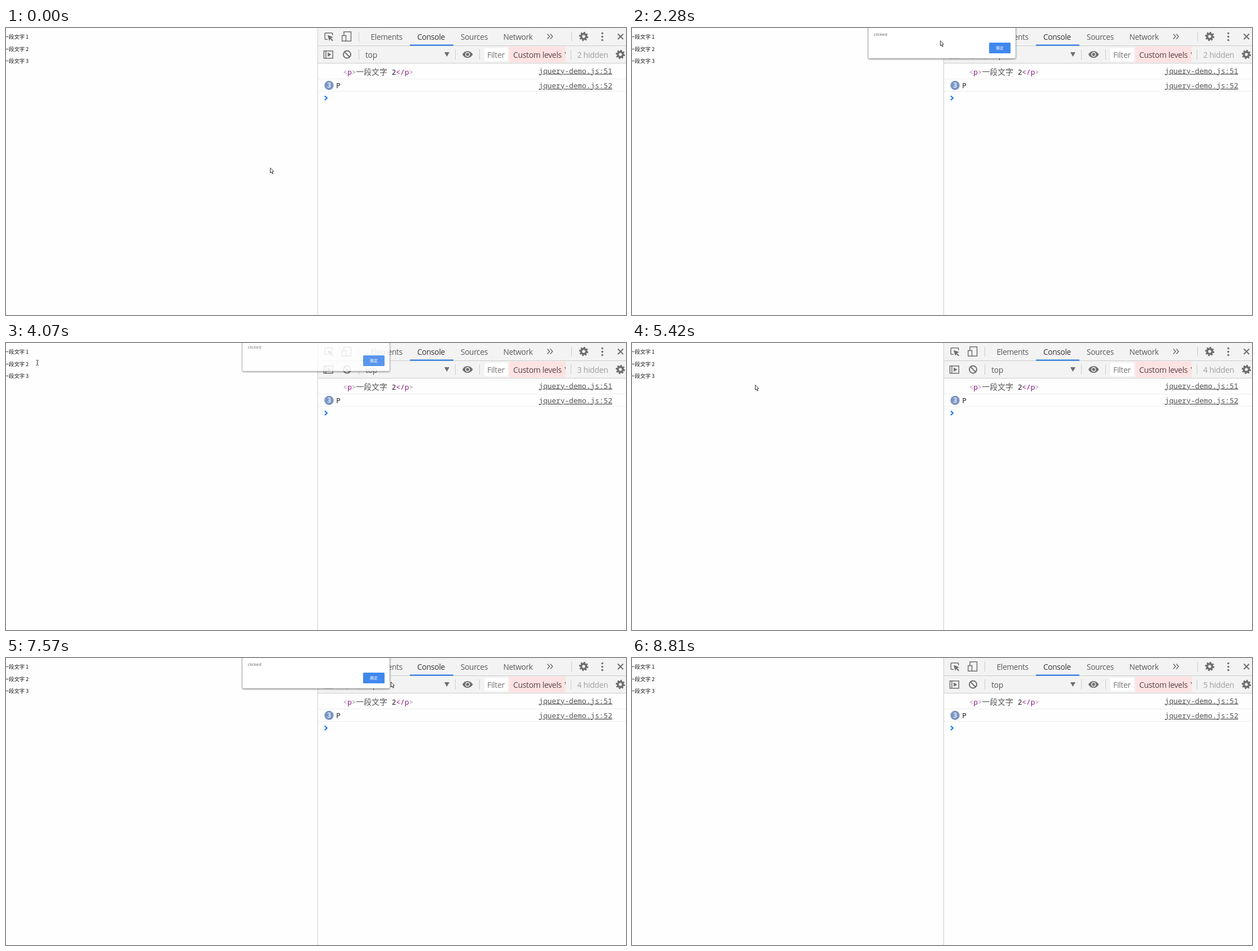
Recreate the animation shown at these times as an HTML page. Size 1099 px wide and 510 px high, loop 9.22 s.

```html
<!DOCTYPE html>
<html lang="zh">
<head>
<meta charset="utf-8">
<title>Click demo</title>
<style>
  html, body { margin: 0; width: 100%; height: 100%; overflow: hidden; background: #fefefe; }
  svg { display: block; }
  text { white-space: pre; }
  .page { font: 9.3px "Noto Sans CJK SC", "Noto Sans CJK", sans-serif; fill: #111; }
  .ui { font: 13.7px "Open Sans", "Noto Sans", sans-serif; letter-spacing: -.025em; fill: #5a5a5a; }
  .mono { font: 12.75px "Noto Sans Mono", "DejaVu Sans Mono", monospace; fill: #222; }
  .cjk { font: 300 13.8px "Noto Sans CJK SC", "Noto Sans CJK", sans-serif; fill: #555; }
  .tip { font: 7.1px "Open Sans", "Noto Sans", sans-serif; fill: #5f6368; }
  .link { fill: #545454; text-decoration: underline; }
  .tag { fill: #881280; }
  .bracket { fill: #a894a6; }
  .icon { fill: none; stroke: #6e6e6e; stroke-width: 1.5; }
  .solid { fill: #6e6e6e; }
  .rule { fill: none; stroke: #ccc; }
  .shadow { filter: drop-shadow(0 1px 1.5px #0008); }
</style>
</head>
<body>
<svg width="1099" height="510" viewBox="0 0 1099 510">
  <defs>
    <g id="gear" class="icon">
      <circle r="4.6" stroke-width="3.6"/>
      <circle r="7" stroke-width="2.4" pathLength="16" stroke-dasharray="1"/>
    </g>
  </defs>

  <g class="page">
    <text x="-4.2" y="19">一段文字 1</text>
    <text x="-4.2" y="40.5">一段文字 2</text>
    <text x="-4.2" y="62">一段文字 3</text>
  </g>

  <g id="highlight">
    <path fill="#f6b26b" fill-opacity=".66" d="M0 21.5H547V31H0zM0 43H547V52.5H0z"/>
    <path fill="#6fa8dc" fill-opacity=".66" d="M0 31H547V43H0z"/>
    <path class="shadow" fill="#fff" d="M-4 57H3L6 53.5 9 57H80.5a2 2 0 0 1 2 2V125a2 2 0 0 1-2 2H-4z"/>
    <g class="tip">
      <text class="tag" x="1" y="69" font-weight="700">p</text>
      <text x="77" y="68.5" text-anchor="end">948 × 21</text>
      <text x="1" y="86" style="font-size:6.6px;letter-spacing:.45px" fill="#333">ACCESSIBILITY</text>
      <text x="1" y="99">Name</text>
      <text x="1" y="110">Role</text>
      <text x="77" y="110" text-anchor="end" style="fill:#303942">paragraph</text>
      <text x="1" y="121">Keyboard-focusable</text>
    </g>
    <path class="rule" d="M55 83.5H77"/>
    <g class="icon" stroke-width=".8" style="stroke-width:.8">
      <circle cx="72.3" cy="118" r="3.3"/><path d="M70 115.7 74.6 120.3"/>
    </g>
  </g>

  <g id="devtools">
    <path fill="#fefefe" d="M552 0H1099V510H552z"/>
    <path fill="#f3f3f3" d="M553 0H1099V62H553z"/>
    <path class="rule" d="M552.5 0V510M553 31.5H1099M553 62.5H1099M625.5 7V24M1002.5 7V24M625.5 38V56M796.5 38V56M839.5 38V56M1001.5 38V56"/>
    <path class="rule" style="stroke:#eee" d="M553 90.5H1099M553 112.5H1099"/>
    <path fill="#1a73e8" d="M716 29.5H793V31.5H716z"/>

    <path class="icon" d="M570 20.3H566.5a1.2 1.2 0 0 1-1.2-1.2V10a1.2 1.2 0 0 1 1.2-1.2H577.6a1.2 1.2 0 0 1 1.2 1.2V13"/>
    <path class="solid" d="M570 12.5 580 16.3 576 18 580 22 578.6 23.4 574.6 19.4 573 23z"/>
    <path class="icon" d="M599 13V6.8H611.5V23.2H603M595.8 13.5H602.5V23.2H595.8z"/>
    <path class="icon" d="M563.5 40.7H579.3V53.8H563.5zM567 41V54"/>
    <path class="solid" d="M570.3 43.5 576.5 47.2 570.3 51z"/>
    <g class="icon" style="stroke-width:2"><circle cx="604.5" cy="47" r="6.5"/><path d="M600 42.5 609 51.5"/></g>
    <path class="solid" d="M777 43H786L781.5 51z"/>
    <path class="solid" d="M809 47C813 39 823 39 827.5 47 823 55 813 55 809 47z"/>
    <circle cx="818.2" cy="47" r="3.5" fill="none" stroke="#f3f3f3" stroke-width="1.5"/>
    <path class="icon" d="M959.5 10.5 963.5 15 959.5 19.5M964.8 10.5 968.8 15 964.8 19.5"/>
    <use href="#gear" x="1024" y="15"/>
    <use href="#gear" x="1089" y="47"/>
    <g class="solid"><circle cx="1057" cy="9.5" r="1.8"/><circle cx="1057" cy="15.5" r="1.8"/><circle cx="1057" cy="21.5" r="1.8"/></g>
    <path class="icon" style="stroke-width:2" d="M1084.5 10.5 1094 20M1094 10.5 1084.5 20"/>

    <path fill="#fff" d="M848 35.5H889.5V58.5H848z"/>
    <path fill="#ffe2e2" d="M892 33H992V61H892z"/>
    <path fill="#555" d="M990.3 43H992V47z"/>
    <g class="ui">
      <text x="646.5" y="21">Elements</text>
      <text x="729" y="21" style="fill:#333">Console</text>
      <text x="806" y="21">Sources</text>
      <text x="881.5" y="21">Network</text>
      <g style="font-size:14px">
        <text x="637" y="52.5">top</text>
        <text x="853" y="52.5" style="fill:#757575">Filter</text>
        <text x="899" y="52.5" style="fill:#5a4545">Custom levels</text>
        <text id="hidden" x="1012.5" y="52.5" style="fill:#a0a0a0"></text>
      </g>
    </g>

    <g class="mono">
      <text y="82.5"><tspan x="597.5" class="bracket">&lt;</tspan><tspan class="tag">p</tspan><tspan class="bracket">&gt;</tspan><tspan x="620.5" class="cjk">一段文字</tspan><tspan x="683.7">2</tspan><tspan class="tag">&lt;/p</tspan><tspan class="bracket">&gt;</tspan></text>
      <text class="link" x="944.5" y="80.5">jquery-demo.js:51</text>
      <text class="link" x="944.5" y="107">jquery-demo.js:52</text>
      <text x="585.3" y="107">P</text>
    </g>
    <circle cx="572.6" cy="102" r="8.2" fill="#7b96c4"/>
    <text class="ui" x="572.6" y="106.3" text-anchor="middle" style="font-size:12px;font-weight:600;fill:#fff">3</text>
    <path fill="none" stroke="#1a73e8" stroke-width="2" d="M565 120.8 569 124.5 565 128.2"/>
  </g>

  <g id="dialog">
    <rect class="shadow" x="419" y="-10" width="261" height="64" rx="2" fill="#fff" stroke="#bbb" stroke-width=".6"/>
    <text class="tip" x="428.5" y="14" style="font-size:7.7px">clicked</text>
    <rect x="633" y="26" width="38" height="19" rx="1.5" fill="#4088ee"/>
    <text class="page" x="652" y="38.3" text-anchor="middle" style="font-size:7px;fill:#fff">确定</text>
  </g>

  <g id="pointer">
    <path id="arrow" fill="#fff" stroke="#222" stroke-width=".9" d="M.5.6V9.6L2.5 7.8 4 11.2 5.4 10.6 4 7.3 6.6 7z"/>
    <path id="beam" fill="none" stroke="#222" d="M-2-4.5H-.5M1-4.5H2.5M.5-4V4M-2 4.5H-.5M1 4.5H2.5"/>
  </g>
</svg>

<script>
  const LOOP = 9220;
  const SLACK = 25;
  // start, end, steps, target x, target y, sideways bend, sharpness
  const moves = [
    [680, 1310, 5, 35, 15, -20],
    [1770, 2700, 8, 650, 36, -18],
    [2820, 3640, 7, 39, 35, 12],
    [4070, 5000, 8, 650, 36],
    [5150, 5550, 4, 126, 82, 0, 2.6],
    [5690, 5820, 2, 147, 64],
    [6090, 6210, 2, 143, 59],
    [6490, 7450, 8, 676, 43.5],
    [7570, 8540, 8, 1046, 464, -133, 3],
    [8660, 8780, 1, 1050, 477],
  ];
  const dialogs = [[1770, 2820], [4070, 5150], [6490, 7690]];
  const el = id => document.getElementById(id);
  const show = (id, on) => el(id).style.display = on ? "" : "none";

  function pointerAt(t) {
    let x = 468, y = 248;
    for (const [start, end, steps, tx, ty, bend = 0, sharpness = 4.8] of moves) {
      if (t < start) break;
      const step = 1 + Math.floor((t - start + SLACK) * (steps - 1) / (end - start));
      const u = Math.min(1, step / steps);
      const e = 1 - (1 - u ** 2.5) ** sharpness;
      x += (tx - x) * e;
      y += (ty - y) * e + 4 * bend * e * (1 - e);
    }
    return [Math.round(x), Math.round(y)];
  }

  function draw(now) {
    const t = now % LOOP;
    const [x, y] = pointerAt(t);
    const overText = x < 58 && y < 66;
    el("pointer").setAttribute("transform", `translate(${x} ${y})`);
    show("pointer", t < 8810);
    show("arrow", !overText);
    show("beam", overText);

    const open = dialogs.find(([from, to]) => t >= from && t < to);
    const entering = open && t - open[0] < 140;
    show("dialog", open);
    el("dialog").setAttribute("opacity", entering ? .86 : 1);
    el("dialog").setAttribute("transform", `translate(0 ${entering ? -4 : 0})`);

    const closed = dialogs.filter(([, to]) => t >= to).length;
    el("hidden").textContent = `${2 + closed} hidden`;
    show("highlight", t >= 7980 && t < 8390);
    requestAnimationFrame(() => draw(performance.now()));
  }
  draw(0);
</script>
</body>
</html>
```
